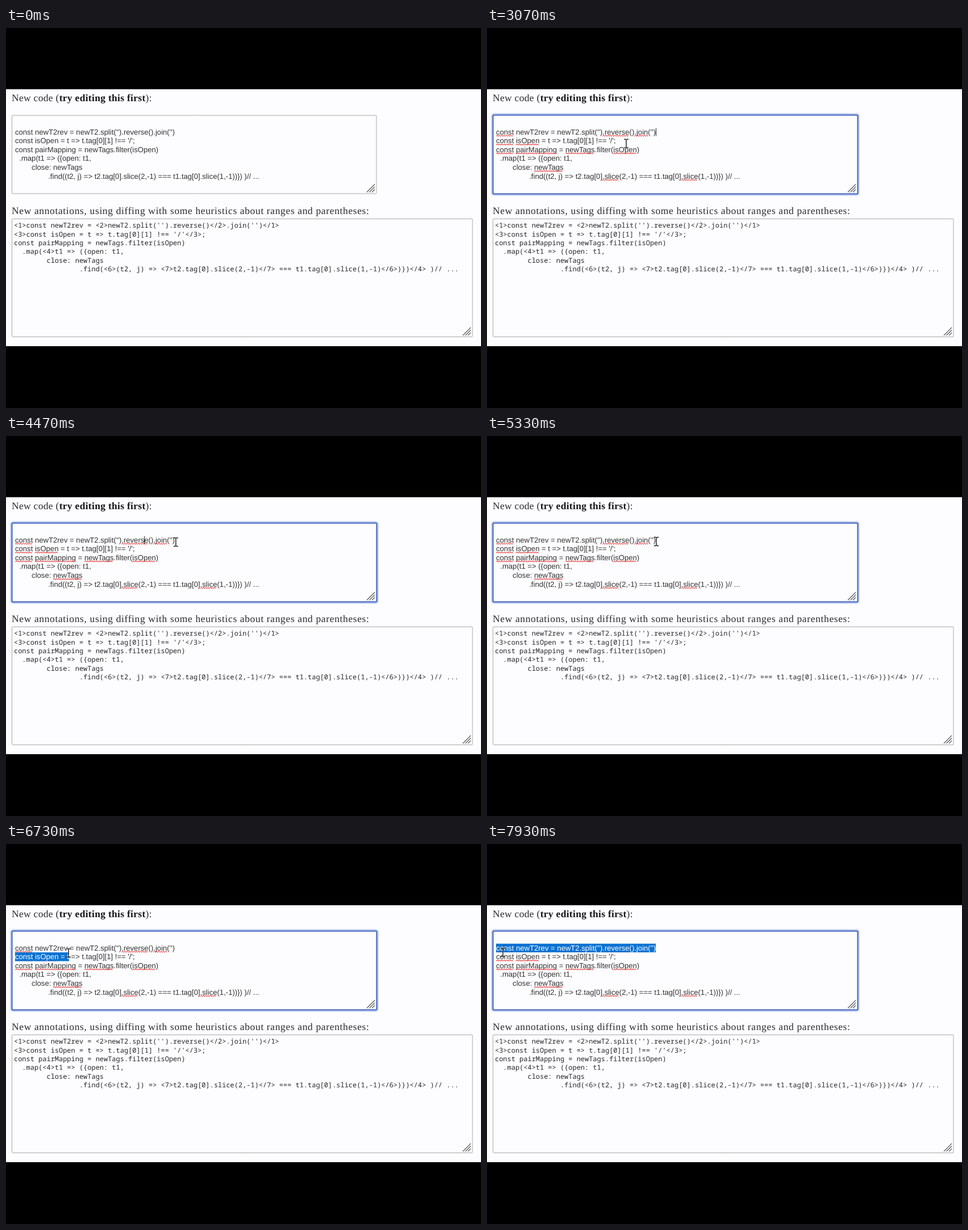
Recreate the animation shown at these times as an HTML page with a canvas. Size 836 by 670 pixels, loop 8000 ms.

```html
<!DOCTYPE html>
<html lang="en">
<head>
<meta charset="utf-8">
<title>Annotated code editor</title>
<style>
html, body { margin: 0; width: 100%; height: 100%; overflow: hidden; background: #000; }
canvas { display: block; }
</style>
</head>
<body>
<canvas id="stage" width="836" height="670"></canvas>
<script>
const ctx = document.getElementById('stage').getContext('2d');
const LOOP = 8000, FPS = 15;
const FOCUS = 1530, CLICK = 3260, DRAG = 6330, DROP = 7130;
const SANS = '13.1px "Liberation Sans", Arial, sans-serif';
const MONO = '11.97px "Noto Sans Mono", monospace';
const SERIF = '17.5px "Liberation Serif", serif';
const INK = '#333';

const code = [
  "const newT2rev = newT2.split('').reverse().join('')",
  "const isOpen = t => t.tag[0][1] !== '/';",
  "const pairMapping = newTags.filter(isOpen)",
  "  .map(t1 => ({open: t1,",
  "        close: newTags",
  "                .find((t2, j) => t2.tag[0].slice(2,-1) === t1.tag[0].slice(1,-1))}) )// ..."
];
const notes = [
  "<1>const newT2rev = <2>newT2.split('').reverse()</2>.join('')</1>",
  "<3>const isOpen = t => t.tag[0][1] !== '/'</3>;",
  "const pairMapping = newTags.filter(isOpen)",
  "  .map(<4>t1 => ({open: t1,",
  "        close: newTags",
  "                .find(<6>(t2, j) => <7>t2.tag[0].slice(2,-1)</7> === t1.tag[0].slice(1,-1)</6>)})</4> )// ..."
];
const misspelt = /const|isOpen|pairMapping|newTags|\.reverse|\.join|\.slice/g;

const LEFT = 16, TOP = 175.5, ROW = 15.6;

// Pointer path: time, x, y
const path = [
  [2740, 349, 260], [3070, 244, 203], [3270, 245, 184], [3470, 248, 184],
  [3800, 262, 177], [4270, 294, 188], [4470, 299, 187], [4730, 299, 187],
  [4800, 298, 188], [5000, 298, 186], [5600, 298, 186], [5800, 304, 184],
  [6070, 300, 184], [6330, 295, 184], [6730, 111, 192], [7070, 10, 192],
  [7130, 7, 184], [7400, 7, 184], [7930, 28, 191]
];

function pointer(t) {
  if (t < path[0][0]) return null;
  const i = path.findIndex(p => p[0] > t);
  if (i < 0) return path[path.length - 1].slice(1);
  const [a, b] = [path[i - 1], path[i]];
  const k = (t - a[0]) / (b[0] - a[0]);
  return [a[1] + (b[1] - a[1]) * k, a[2] + (b[2] - a[2]) * k];
}

function text(str, x, y, font, color, spacing = '0px') {
  ctx.font = font;
  ctx.letterSpacing = spacing;
  ctx.fillStyle = color;
  ctx.fillText(str, x, y);
  return x + ctx.measureText(str).width;
}

function rect(x, y, w, h, color) {
  ctx.fillStyle = color;
  ctx.fillRect(x, y, w, h);
}

function frame(x, y, w, h, r, color, width) {
  ctx.strokeStyle = color;
  ctx.lineWidth = width;
  ctx.beginPath();
  ctx.roundRect(x, y, w, h, r);
  ctx.stroke();
}

// Horizontal position of a character gap in a code row
function gapX(row, index) {
  ctx.font = SANS;
  ctx.letterSpacing = '0px';
  return LEFT + ctx.measureText(code[row].slice(0, index)).width;
}

function nearestGap(row, x) {
  let best = 0;
  for (let i = 1; i <= code[row].length; i++) {
    if (Math.abs(gapX(row, i) - x) < Math.abs(gapX(row, best) - x)) best = i;
  }
  return best;
}

function grip(x, y) {
  ctx.strokeStyle = '#555';
  ctx.lineWidth = 1.1;
  ctx.beginPath();
  for (const d of [14, 9.5, 5]) {
    ctx.moveTo(x - d, y);
    ctx.lineTo(x, y - d);
  }
  ctx.stroke();
}

function squiggle(x0, x1, y) {
  ctx.strokeStyle = 'rgba(226, 50, 50, .85)';
  ctx.lineWidth = 1.1;
  ctx.beginPath();
  ctx.moveTo(x0, y + 0.8);
  for (let x = x0 + 2, up = true; x <= x1; x += 2, up = !up) {
    ctx.lineTo(x, y + (up ? -0.8 : 0.8));
  }
  ctx.stroke();
}

function headings() {
  let x = text('New code (', 10, 129, SERIF, '#2a2a2c', '0.3px');
  x = text('try editing this first', x, 129, 'bold ' + SERIF, '#161618', '0.3px');
  text('):', x, 129, SERIF, '#2a2a2c', '0.3px');
  text('New annotations, using diffing with some heuristics about ranges and parentheses:',
    10, 327.5, SERIF, '#2a2a2c', '0.63px');
}

function selection(t) {
  if (t < DRAG) return null;
  const end = code[0].length;
  if (t >= DROP) return { row: 0, from: 0, to: end };
  const [x, y] = pointer(t);
  const row = y < TOP + ROW ? 0 : 1;
  const gap = nearestGap(row, x);
  return row ? { row, from: 0, to: gap } : { row, from: gap, to: end };
}

function editor(t) {
  const focused = t >= FOCUS;
  if (focused) {
    frame(8.5, 151.5, 646, 143, 4, '#c9d6f3', 3);
    frame(10.5, 153.5, 642, 139, 2, '#3c5fc0', 2);
  } else {
    frame(10.5, 154, 641.5, 138, 1, '#a9a9a9', 1);
  }
  grip(649, 289.5);

  code.forEach((line, i) => {
    const y = 187.6 + i * ROW;
    text(line, LEFT, y, SANS, INK);
    if (!focused) return;
    for (const m of line.matchAll(misspelt)) {
      squiggle(gapX(i, m.index), gapX(i, m.index + m[0].length), y + 2.3);
    }
  });

  const sel = selection(t);
  if (sel && sel.to > sel.from) {
    const x0 = gapX(sel.row, sel.from), x1 = gapX(sel.row, sel.to);
    const y = TOP + sel.row * ROW;
    ctx.save();
    ctx.beginPath();
    ctx.rect(x0, y, x1 - x0, ROW);
    ctx.clip();
    rect(x0, y, x1 - x0, ROW, '#0a72d2');
    text(code[sel.row], LEFT, 187.6 + sel.row * ROW, SANS, '#fff');
    ctx.restore();
  }
}

function caret(t) {
  if (t < FOCUS || t >= DRAG + 70) return;
  const start = t >= DRAG ? DRAG : t >= CLICK ? CLICK : FOCUS;
  const on = (t - start) % 1040 < 510;
  const split = code[0].indexOf('reverse') + 'revers'.length;
  const gap = start === CLICK ? split : code[0].length;
  if (on) rect(Math.round(gapX(0, gap)), 176.5, 1, 14, '#222');
}

function beam(x, y) {
  const trace = () => {
    ctx.beginPath();
    for (const s of [-1, 1]) {
      ctx.moveTo(x - 4, y + s * 7.5);
      ctx.lineTo(x - 1.5, y + s * 7.5);
      ctx.lineTo(x, y + s * 6.5);
      ctx.lineTo(x + 1.5, y + s * 7.5);
      ctx.lineTo(x + 4, y + s * 7.5);
    }
    ctx.moveTo(x, y - 6.5);
    ctx.lineTo(x, y + 6.5);
    ctx.stroke();
  };
  ctx.strokeStyle = 'rgba(255, 255, 255, .6)';
  ctx.lineWidth = 2.6;
  trace();
  ctx.strokeStyle = '#161616';
  ctx.lineWidth = 1.4;
  trace();
}

function draw(t) {
  rect(0, 0, 836, 670, '#000');
  rect(0, 108, 836, 453, '#fdfcfe');
  headings();
  frame(10.5, 336.5, 810.5, 208, 1, '#a9a9a9', 1);
  grip(818, 542);
  notes.forEach((line, i) => text(line, 14, 352.2 + i * 15.4, MONO, '#262626'));
  editor(t);
  caret(t);
  const p = pointer(t);
  if (p) beam(...p);
}

ctx.textRendering = 'geometricPrecision';
const born = performance.now();
function tick() {
  const t = (performance.now() - born) % LOOP;
  draw(Math.floor((t + 4) * FPS / 1000) * 1000 / FPS);
  requestAnimationFrame(tick);
}
tick();
</script>
</body>
</html>
```
